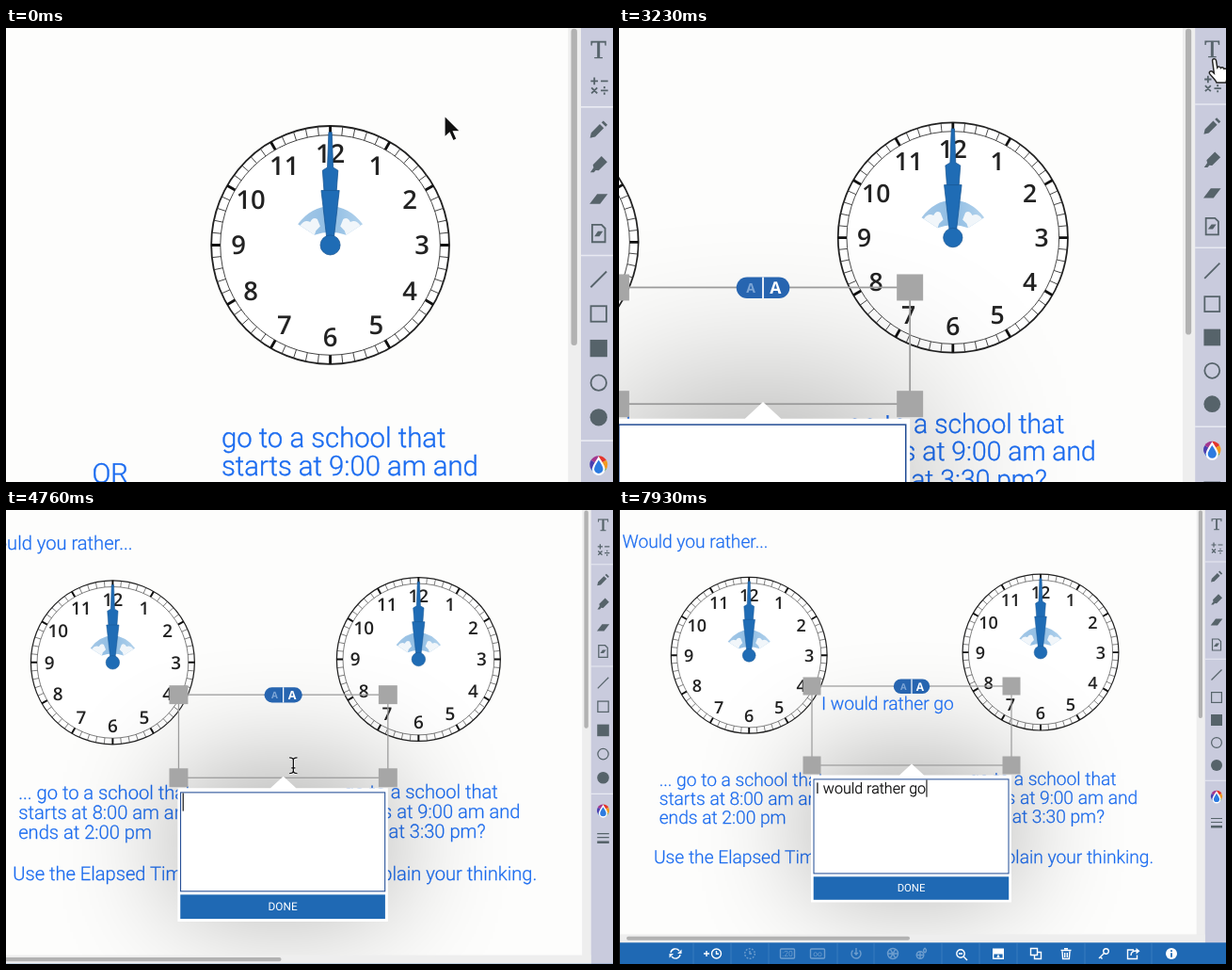
Recreate the animation shown at these times as an HTML page. Size 645x482 px, loop 8000 ms.

```html
<!DOCTYPE html>
<html lang="en">
<head>
<meta charset="utf-8">
<title>Would you rather</title>
<style>
html, body { margin: 0; width: 100%; height: 100%; overflow: hidden; background: #fdfdfc; }
svg { display: block; width: 645px; height: 482px; }
text { white-space: pre; }
.copy { font: 300 19.2px Roboto, sans-serif; fill: #1a6bf0; stroke: #1a6bf0; stroke-width: .25; }
.field { font: 300 16px Roboto, sans-serif; fill: #000; stroke: #000; stroke-width: .2; }
.num { font: 600 18px "Open Sans", "Noto Sans", sans-serif; fill: #222; text-anchor: middle; }
.mid { text-anchor: middle; }
.line { fill: none; stroke: #56636a; stroke-width: 1.2; }
.solid { fill: #56636a; }
.bar { fill: none; stroke: #fff; stroke-width: 1.4; }
.bar .f { fill: #fff; stroke: none; }
.dim { opacity: .35; }
</style>
</head>
<body>
<svg viewBox="0 0 645 482" text-rendering="geometricPrecision">
  <defs>
    <filter id="blur" filterUnits="userSpaceOnUse" x="20" y="60" width="580" height="540">
      <feGaussianBlur stdDeviation="60"/>
    </filter>
    <linearGradient id="sky"><stop offset="0" stop-color="#a5c8e6"/><stop offset=".5" stop-color="#8fbde4"/><stop offset="1" stop-color="#b4d3ec"/></linearGradient>
    <g id="clock"></g>
  </defs>
  <g id="cam">
    <rect width="645" height="482" fill="#fdfdfc"/>
    <g id="page"></g>
    <g id="editor">
      <rect x="204" y="265" width="213" height="140" fill="#000" opacity=".33" filter="url(#blur)"/>
      <rect x="205" y="187" width="212" height="84" fill="none" stroke="#9b9b9b" stroke-width="1.2"/>
      <g id="handles" fill="#a6a6a6"></g>
      <rect x="291.8" y="179.5" width="38.4" height="15.4" rx="7.7" fill="#2765b0"/>
      <path d="M311 179.5v15.4" stroke="#fff" stroke-width="1.2"/>
      <g class="mid" font-family="Open Sans, sans-serif" font-weight="700">
        <text x="302.3" y="190.6" font-size="9.5" fill="#7ea6d6">A</text>
        <text x="320" y="191.5" font-size="12" fill="#fff">A</text>
      </g>
      <text id="big" class="copy" x="215" y="212"></text>
      <path d="M311 269.5l13 12h93v135h-213v-135h94z" fill="#fff"/>
      <rect x="207" y="285.9" width="207" height="100" fill="#fff" stroke="#1f4a94"/>
      <rect x="206.7" y="389.3" width="207.5" height="24.5" fill="#1f69b4"/>
      <text class="mid" x="310.5" y="405.3" font-family="Roboto, sans-serif" font-size="11.3" fill="#fff">DONE</text>
      <text id="small" class="field" x="208.7" y="301"></text>
      <rect id="caret" y="286.5" width="1.1" height="18.2" fill="#111"/>
    </g>
    <g id="chrome"></g>
    <g id="cursor">
      <path data-k="arrow" d="M0 0V15.2L3.5 12 6 17.5 8.6 16.3 6.2 11H11z" fill="#111" stroke="#fff" stroke-width=".8"/>
      <path data-k="hand" d="M-1.2 1.3C-1.2-.6 1.3-.6 1.5 1.2L2.3 6.2C3 5.2 4.600 5.5 4.8 6.6 5.7 5.7 7 6.2 7.2 7.2 8.4 6.6 9.5 7.4 9.5 8.7L9.7 12.5 8.6 17H1.8C.8 14.5-1.8 12.7-3.3 10.5-3.8 9.2-2.3 8.3-1.2 9.2L0 10.3z" fill="#fff" stroke="#222"/>
      <g data-k="beam" fill="none">
        <path d="M-4-8Q0-8 0-5.5 0-8 4-8M0-6V6M-4 8Q0 8 0 5.5 0 8 4 8M-2 2.5H2" stroke="#fff" stroke-width="2.8"/>
        <path d="M-4-8Q0-8 0-5.5 0-8 4-8M0-6V6M-4 8Q0 8 0 5.5 0 8 4 8M-2 2.5H2" stroke="#111" stroke-width="1.3"/>
      </g>
    </g>
  </g>
</svg>
<script>
const $ = id => document.getElementById(id);
const polar = (r, deg) => {
  const a = deg * Math.PI / 180;
  return [r * Math.sin(a), -r * Math.cos(a)];
};
const at = (x, y, body, cls = '') => `<g class="${cls}" transform="translate(${x} ${y})">${body}</g>`;
const path = (d, cls = '') => `<path class="${cls}" d="${d}"/>`;
const copy = (x, y, s, more = '') => `<text class="copy" x="${x}" y="${y}" ${more}>${s}</text>`;

function clockFace() {
  let thin = '', bold = '', nums = '';
  for (let i = 0; i < 60; i++) {
    const d = `M${polar(76.6, i * 6)}L${polar(83, i * 6)}`;
    if (i % 5) thin += d; else bold += d;
  }
  for (let h = 1; h <= 12; h++) {
    const [x, y] = polar(64, h * 30);
    nums += `<text class="num" x="${x}" y="${y + 6.5}">${h}</text>`;
  }
  return `<circle r="82.9" fill="#fff" stroke="#222" stroke-width="1.2"/>
    <circle r="76.6" fill="none" stroke="#333" stroke-width=".6"/>
    <path d="${thin}" stroke="#333" stroke-width=".6"/>
    <path d="${bold}" stroke="#111" stroke-width="1.9"/>
    <path d="M-22.6-14.5Q-13-27 0-27T22.6-14.5L11-7Q0-11-11-7z" fill="url(#sky)"/>
    <path d="M-21-13.5Q-18-18-14-16-12-20-9-18L-7-13-10-10-11-7zM21-13.5Q18-18 14-16 12-20 9-18L7-13 10-10 11-7z" fill="#f1f6fa"/>
    ${nums}
    <g fill="#1f6cb5" stroke="#185694" stroke-width=".5">
      <path d="M-1.1-78.5H1.1L2-54 5.4-52 2-6H-2L-5.4-52-2-54z"/>
      <path d="M-6.3-38H6.3L2.5-5H-2.5z"/>
      <circle r="6.9"/>
    </g>`;
}

function rightBar() {
  const wheel = ['#e5352b', '#f29a1f', '#59a83a', '#2f6fd0', '#4a3fb0', '#a3378f'].map((c, i) =>
    `<path d="M0 0L${polar(6.2, i * 60)}A6.2 6.2 0 0 1 ${polar(6.2, i * 60 + 60)}z" fill="${c}"/>`).join('');
  const drop = 'M0-4.5Q3.8 1 3.8 3A3.8 3.8 0 0 1-3.8 3Q-3.8 1 0-4.5z';
  const icons = [
    [15, '<text class="mid solid" y="6" font-family="Liberation Serif, serif" font-size="18" stroke="#56636a" stroke-width=".3">T</text>'],
    [40, path('M-5.5-3h5M-3-5.5v5M1.5-3h5M-5 1.5l4 4M-1 1.5l-4 4M1.5 3.5h5M4 .7v1.5M4 4.9v1.5', 'line')],
    [71, path('M-6 5.5l.8-3.6 6-6 2.8 2.8-6 6zM2-5.2l1.3-1.2 2.8 2.8-1.2 1.3z', 'solid')],
    [95, path('M-5.8 5.5l2.3-3.3-.5-2 6-6 4 4-6 6-2-.2-1.3 1.5z', 'solid')],
    [119, path('M-6.3 3.5l5.3-7h7.3l-5.3 7z', 'solid')],
    [143, path('M-4.5-6h6.5l2.5 2.5v9.5h-9z', 'line') + path('M-3 2l2.5-3.5h3.5l-2.5 3.5z', 'solid')],
    [175, path('M-5.5 5.5l11-11', 'line')],
    [199, '<rect class="line" x="-5.4" y="-5.4" width="10.8" height="10.8"/>'],
    [223, '<rect class="solid" x="-6" y="-6" width="12" height="12"/>'],
    [247, '<circle class="line" r="5.4"/>'],
    [271, '<circle class="solid" r="6"/>'],
    [304, wheel + `<path d="${drop}" fill="#2c7be0" stroke="#fff" stroke-width="1.4"/>`],
    [332, path('M-6-4.5h12M-6-.5h12', 'line') + path('M-6 3h12v2.5h-12z', 'solid')]
  ];
  return `<rect x="613.7" width="9" height="460" fill="#eee"/>
    <rect x="615.8" y=".5" width="4.2" height="220.5" rx="2.1" fill="#b2b2b2"/>
    <rect x="622.7" width="23" height="460" fill="#c9cbdd"/>
    <path d="M622.7 55h23M622.7 158.3h23M622.7 287.3h23" stroke="#e8e9f2"/>` +
    icons.map(([y, b]) => at(635, y, b)).join('');
}

function bottomBar() {
  const ring = r => `<circle r="${r}"/>`;
  const tag = s => `<rect x="-7.5" y="-5" width="15" height="10" rx="1"/><text class="f mid" y="3" font-family="Roboto, sans-serif" font-size="8.5">${s}</text>`;
  const on = [
    [60, path('M-5-1A5 5 0 0 1 4-3M5 1A5 5 0 0 1-4 3') + path('M6.5-4.5v4.5h-4.5zM-6.5 4.5v-4.5h4.5z', 'f')],
    [99, path('M-9 0h6M-6-3v6') + at(4.5, 0, ring(5) + path('M0-3v3.2h2.5'))],
    [363, ring(4.2) + path('M3 3l4 4M-2 0h4')],
    [403, path('M-6-5.5h12v6h-12z', 'f') + path('M-5.3-5v10.3h10.6v-10.3M-1 4l1-2 1 2')],
    [443, path('M-5.5-5.5h7v7h-7zM2-1.5h3.5v7h-7v-3.5')],
    [475, path('M-5.5-3.5h11M-2-5.3h4M-4-2.5l.6 8h6.8l.6-8M-1.3-1v5M1.3-1v5')],
    [515, '<circle cx="2.5" cy="-2.5" r="2.8"/>' + path('M.5-.5l-5.5 5.5M-3.5 3.5l2 2')],
    [546, path('M1-4h-6.5v9.5h10v-4M-2 2q0-5 6-5') + path('M3.5-6l4 3.2-4 3.2z', 'f')],
    [587, '<circle class="f" r="6"/><path d="M0-.8v4.5M0-3.7v1.7" stroke="#1f69b4" stroke-width="1.8"/>']
  ];
  const off = [
    [139, '<circle r="5.3" stroke-dasharray="1.8 1.5"/>' + path('M0-3v3h2')],
    [179, tag(':20')],
    [211, tag('oo')],
    [252, path('M-3.5-3.5a5 5 0 1 0 7 0M0-6v7M-2-1l2 2 2-2')],
    [291, ring(5.5) + path('M-5.5 0h11M-2.7-4.7l5.4 9.4M2.7-4.7l-5.4 9.4')],
    [322, '<circle cx="-2" cy="1.5" r="3.8"/>' + path('M-5 1.5h6M-2-2v7M3-6q3 3 0 5-3-2 0-5')]
  ];
  const seps = [79, 119, 159, 232, 271, 343, 383, 423, 495, 566].map(x => `M${x} 460v22`).join('');
  return `<rect y="450.5" width="622.7" height="9.5" fill="#eee"/>
    <rect x="8" y="452.8" width="301" height="4" rx="2" fill="#b2b2b2"/>
    <rect y="459.3" width="645" height="24" fill="#1f69b4"/>
    <path d="${seps}" stroke="#3f80c2" stroke-width=".8"/>` +
    on.map(([x, b]) => at(x, 471, b, 'bar')).join('') +
    off.map(([x, b]) => at(x, 471, b, 'bar dim')).join('') +
    '<rect width="1" height="482" fill="#111"/>';
}

$('clock').innerHTML = clockFace();
$('page').innerHTML =
  copy(3.5, 40, 'Would you rather...') +
  '<use href="#clock" x="138.2" y="154.3"/><use href="#clock" x="448" y="151.1"/>' +
  ['... go to a school that', 'starts at 8:00 am and', 'ends at 2:00 pm'].map((s, i) => copy(42.7, 292.6 + i * 20, s)).join('') +
  ['go to a school that', 'starts at 9:00 am and', 'ends at 3:30 pm?'].map((s, i) => copy(372.2, 291.9 + i * 19.9, s)).join('') +
  copy(282, 317, 'OR') +
  copy(37, 375, 'Use the Elapsed Time') +
  copy(568, 375, 'explain your thinking.', 'text-anchor="end"');
$('handles').innerHTML = [205, 417].flatMap(x => [187, 271].map(y =>
  `<rect x="${x - 9.5}" y="${y - 9.5}" width="19" height="19"/>`)).join('');
$('chrome').innerHTML = rightBar() + bottomBar();

const LOOP = 8000, ZOOM = 1.525;
const phrase = 'I would rather go';
const keys = [6100, 6180, 6260, 6400, 6500, 6600, 6700, 6830, 7030, 7130, 7260, 7360, 7500, 7560, 7660, 7800, 7930];
const unit = (t, from, to) => Math.min(1, Math.max(0, (t - from) / (to - from)));
const smooth = u => u * u * (3 - 2 * u);
const smoother = u => u * u * u * (u * (6 * u - 15) + 10);
const mix = (a, b, p) => a.map((v, i) => v + (b[i] - v) * p);

const rest = [527.6, 61], tool = [636.4, 22.3], field = [258, 306];
const pointer = t => t < 3000
  ? mix(rest, tool, smooth(unit(t, 1500, 2000)))
  : mix(tool, field, smooth(unit(t, 4130, 4982)));

function draw(t) {
  const s = ZOOM + (1 - ZOOM) * smoother(unit(t, 2500, 5475));
  $('cam').setAttribute('transform', `translate(${645 * (1 - s)} 0) scale(${s})`);

  $('editor').setAttribute('opacity', t < 2360 ? 0 : t < 2400 ? .5 : 1);
  const typed = phrase.slice(0, keys.filter(k => k <= t).length);
  $('big').textContent = $('small').textContent = typed;
  $('caret').setAttribute('x', 209 + (typed ? $('small').getComputedTextLength() : 0));
  const lit = typed || Math.floor((t - 2190) / 530) % 2 === 0;
  $('caret').setAttribute('opacity', lit ? 1 : 0);

  const [x, y] = pointer(t);
  const kind = t >= keys[0] ? '' : x < 417 ? 'beam' : x > 622 && t < 4130 ? 'hand' : 'arrow';
  $('cursor').setAttribute('transform', `translate(${x} ${y})`);
  for (const c of $('cursor').children) c.setAttribute('opacity', c.dataset.k === kind ? 1 : 0);
}

const start = performance.now();
function tick() {
  draw((performance.now() - start) % LOOP);
  requestAnimationFrame(tick);
}
tick();
</script>
</body>
</html>
```
